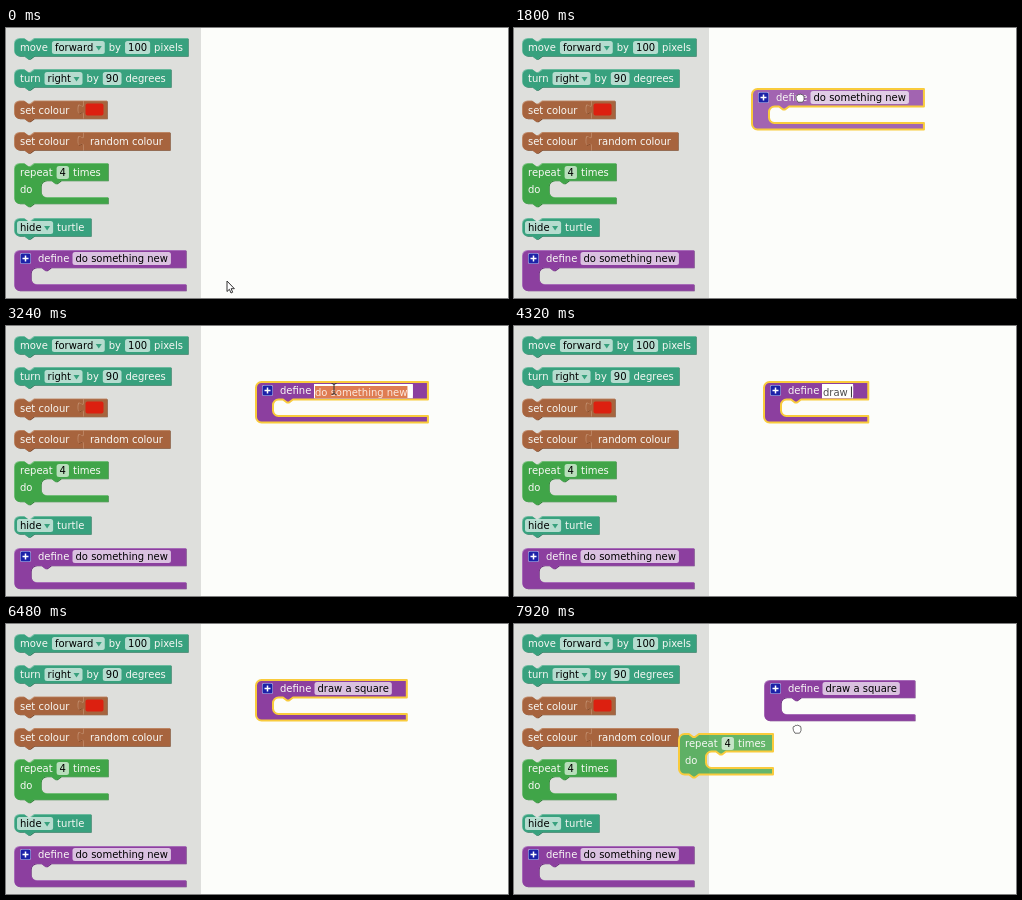
An HTML page with a canvas that plays this animation: 502x270 px, repeating every 8000 ms.

```html
<!DOCTYPE html>
<html lang="en">
<head>
<meta charset="utf-8">
<title>Block editor</title>
<style>
  html, body { margin: 0; width: 100%; height: 100%; overflow: hidden; background: #fcfdfa; }
  canvas { display: block; width: 502px; height: 270px; }
</style>
</head>
<body>
<canvas id="stage"></canvas>
<script>
const W = 502, H = 270, LOOP = 8000, STEP = 180;
const canvas = document.getElementById('stage');
const ctx = canvas.getContext('2d');
const dpr = window.devicePixelRatio || 1;
canvas.width = W * dpr;
canvas.height = H * dpr;

const FONT = '10px "DejaVu Sans", Verdana, sans-serif';
const TEAL = ['#38a17e', '#7cc2a9', '#2a7c60'];
const BROWN = ['#a7643e', '#c39070', '#7d4829'];
const GREEN = ['#40a548', '#80c585', '#2f7f36'];
const PURPLE = ['#8c3f9f', '#b07bc0', '#682b7a'];
const YELLOW = '#f9cb3c';
const OLD_NAME = 'do something new', NEW_NAME = 'draw a square';
const R = 5.5;

// Timeline in ms
const GRAB = 1080, DROP = 2160, EDIT = 2880, TYPE = 3420, KEY = 225, DONE = 6300;
const SHOW = 6660, GRAB2 = 7380;
const HOME = [8, 222], REPEAT = [8, 135];
const pointerPath = [[0, 221, 253], [360, 218, 252], [900, 57, 231], [GRAB, 57, 231],
  [1800, 286, 70], [DROP, 298, 65], [2340, 298, 65], [2700, 328, 63], [SHOW, 328, 63],
  [7200, 50, 144], [GRAB2, 50, 144], [7920, 283, 105]];
const definePath = [[GRAB, ...HOME], [1800, 238, 61], [DROP, 250, 56]];
const repeatPath = [[GRAB2, ...REPEAT], [7920, 165, 110]];

function along(keys, t) {
  if (t <= keys[0][0]) return keys[0].slice(1);
  for (let i = 1; i < keys.length; i++) {
    const [t0, x0, y0] = keys[i - 1], [t1, x1, y1] = keys[i];
    if (t <= t1) {
      const p = (t - t0) / (t1 - t0);
      return [x0 + (x1 - x0) * p, y0 + (y1 - y0) * p];
    }
  }
  return keys[keys.length - 1].slice(1);
}

function textWidth(s) {
  ctx.font = FONT;
  return ctx.measureText(s).width;
}

function text(s, x, y, color = '#f8f8f5') {
  ctx.font = FONT;
  ctx.fillStyle = color;
  ctx.fillText(s, x, y);
}

function rounded(x, y, w, h, r, fill) {
  ctx.beginPath();
  ctx.roundRect(x, y, w, h, r);
  ctx.fillStyle = fill;
  ctx.fill();
}

// Outline of a stacking block, optionally with a statement mouth
function blockShape(x, y, w, h, { stack = true, mouth } = {}) {
  const p = new Path2D();
  const bump = (left, top) => {
    p.lineTo(left + 20, top);
    p.lineTo(left + 16, top + 3);
    p.lineTo(left + 14, top + 3);
    p.lineTo(left + 10, top);
  };
  p.moveTo(x, y + R);
  p.arcTo(x, y, x + R, y, R);
  if (stack) {
    p.lineTo(x + 10, y);
    p.lineTo(x + 14, y + 3);
    p.lineTo(x + 16, y + 3);
    p.lineTo(x + 20, y);
  }
  p.lineTo(x + w, y);
  if (mouth) {
    const mx = x + mouth, top = y + 17.5, bottom = y + 34;
    p.lineTo(x + w, top);
    bump(mx, top);
    p.arcTo(mx, top, mx, top + R, R);
    p.arcTo(mx, bottom, mx + R, bottom, R);
    p.lineTo(x + w, bottom);
  }
  p.lineTo(x + w, y + h);
  if (stack) bump(x, y + h);
  p.arcTo(x, y + h, x, y + h - R, R);
  p.closePath();
  return p;
}

// Value block with a puzzle tab on its left side
function valueShape(x, y, w, h) {
  return new Path2D(`M${x} ${y}v3.4c0 6.8 -5.4 -5.4 -5.4 5.1s5.4 -1.7 5.4 5.1V${y + h}h${w}V${y}z`);
}

function paint(shape, [main, light, dark], state) {
  if (state) {
    ctx.globalAlpha = state === 'drag' ? 0.8 : 1;
    ctx.fillStyle = main;
    ctx.fill(shape);
    ctx.globalAlpha = 1;
    ctx.strokeStyle = YELLOW;
    ctx.lineWidth = 2;
    ctx.lineJoin = 'round';
    ctx.stroke(shape);
    return;
  }
  const shifted = color => {
    ctx.save();
    ctx.translate(0.7, 0.7);
    ctx.fillStyle = color;
    ctx.fill(shape);
    ctx.restore();
  };
  shifted(dark);
  ctx.fillStyle = light;
  ctx.fill(shape);
  ctx.save();
  ctx.clip(shape);
  shifted(main);
  ctx.restore();
}

// Lays out labels, [fields] and {menus} from left to right
function row(parts, x, y, color) {
  for (const part of parts) {
    const isLabel = typeof part === 'string';
    const s = isLabel ? part : part.menu || part.field;
    const w = textWidth(s);
    if (isLabel) {
      text(s, x, y + 13);
      x += w + 4;
      continue;
    }
    const full = w + (part.menu ? 14.5 : 6);
    rounded(x, y + 3, full, 13, 2.5, 'rgba(255,255,255,.63)');
    text(s, x + 3, y + 13, '#000');
    if (part.menu) {
      const ax = x + w + 5.5;
      ctx.beginPath();
      ctx.moveTo(ax, y + 8);
      ctx.lineTo(ax + 6, y + 8);
      ctx.lineTo(ax + 3, y + 12.5);
      ctx.fillStyle = color;
      ctx.fill();
    }
    x += full + 4;
  }
}

function simpleBlock(y, w, parts, colors = TEAL) {
  paint(blockShape(8, y, w, 18), colors);
  row(parts, parts[0].menu ? 11 : 14, y, colors[0]);
}

function colourBlock(y, w) {
  simpleBlock(y, 69, ['set colour'], BROWN);
  paint(valueShape(77, y, w, 18), BROWN);
}

function repeatBlock([x, y], state) {
  paint(blockShape(x, y, 94, 40.5, { mouth: 27 }), GREEN, state);
  row(['repeat', { field: '4' }, 'times'], x + 6, y, GREEN[0]);
  text('do', x + 6, y + 30);
}

function defineBlock([x, y], name, state) {
  const w = textWidth(name);
  paint(blockShape(x, y, w + 79.5, 40.5, { stack: false, mouth: 17 }), PURPLE, state);
  rounded(x + 6, y + 3, 11, 11, 2, '#d5d5f0');
  rounded(x + 6.5, y + 3.5, 10, 10, 1.5, '#1b21a8');
  ctx.fillStyle = '#fff';
  ctx.fillRect(x + 8.5, y + 7.75, 6, 1.5);
  ctx.fillRect(x + 10.75, y + 5.5, 1.5, 6);
  text('define', x + 24, y + 12);
  rounded(x + 58.5, y + 2, w + 6, 13, 2.5, 'rgba(255,255,255,.68)');
  text(name, x + 61.5, y + 12, '#000');
}

function editor([x, y], typed, name) {
  const w = textWidth(name) + 6.5, left = x + 58, top = y + 2;
  const tw = textWidth(typed || name);
  const tx = Math.min(left + 1, left + w - 1 - tw);
  ctx.save();
  ctx.beginPath();
  ctx.rect(left, top, w, 14.5);
  ctx.clip();
  ctx.fillStyle = '#fff';
  ctx.fillRect(left, top, w, 14.5);
  if (typed) {
    text(typed, tx, y + 13.5, '#4c4c4c');
    ctx.fillStyle = '#333';
    ctx.fillRect(tx + tw, top + 2.5, 1, 11);
  } else {
    ctx.fillStyle = '#df7c52';
    ctx.fillRect(tx, top + 2, tw, 12);
    text(name, tx, y + 13.5, '#fbe9df');
  }
  ctx.restore();
}

function drawFlyout() {
  ctx.fillStyle = '#dedfdc';
  ctx.fillRect(0, 0, 195, H);
  simpleBlock(10, 174, ['move', { menu: 'forward' }, 'by', { field: '100' }, 'pixels']);
  simpleBlock(41, 157, ['turn', { menu: 'right' }, 'by', { field: '90' }, 'degrees']);
  colourBlock(72.5, 24);
  rounded(79.5, 75.5, 18, 12, 2, '#dc2010');
  colourBlock(104, 87);
  text('random colour', 84, 117);
  repeatBlock(REPEAT);
  simpleBlock(190, 77, [{ menu: 'hide' }, 'turtle']);
  defineBlock(HOME, OLD_NAME);
}

const pointers = {
  arrow: new Path2D('M0 0V10.5L2.4 8.3L4 12L5.7 11.2L4.1 7.7H7.4z'),
  hand: new Path2D('M-4 -1Q-4 -3 -2.3 -2.6Q-1.8 -4.4 -.3 -3.5Q1 -4.6 2 -3.1Q4 -3.4 4 -1V1.5Q3.4 3 2.6 4.2H-2Q-4 1.8 -4 -1z'),
  beam: new Path2D('M-2.5 -5.5Q0 -5.5 0 -4V4Q0 5.5 -2.5 5.5M2.5 -5.5Q0 -5.5 0 -4M0 4Q0 5.5 2.5 5.5')
};

function drawPointer(kind, [x, y]) {
  ctx.save();
  ctx.translate(x, y);
  ctx.lineWidth = kind === 'hand' ? 0.7 : 1;
  ctx.strokeStyle = '#333';
  ctx.fillStyle = '#fff';
  if (kind !== 'beam') ctx.fill(pointers[kind]);
  ctx.stroke(pointers[kind]);
  ctx.restore();
}

function pointerKind(t) {
  if ((t >= GRAB && t < 2520) || t >= GRAB2) return 'hand';
  if (t >= 2520 && t < TYPE) return 'beam';
  return 'arrow';
}

function draw(t) {
  ctx.setTransform(dpr, 0, 0, dpr, 0, 0);
  ctx.fillStyle = '#fcfdfa';
  ctx.fillRect(0, 0, W, H);
  drawFlyout();

  if (t >= GRAB) {
    const pos = along(definePath, t);
    const count = Math.max(0, Math.floor((t - TYPE) / KEY) + 1);
    // While typing, the block follows one key behind the editor
    const name = t >= DONE ? NEW_NAME : count > 1 ? NEW_NAME.slice(0, count - 1) : OLD_NAME;
    const state = t <= DROP ? 'drag' : t < GRAB2 ? 'selected' : '';
    defineBlock(pos, name, state);
    if (t >= EDIT && t < DONE) editor(pos, NEW_NAME.slice(0, count), name);
  }
  if (t >= GRAB2) repeatBlock(along(repeatPath, t), 'drag');
  if (t < TYPE || t >= SHOW) drawPointer(pointerKind(t), along(pointerPath, t));
}

const start = performance.now();
function tick() {
  const t = (performance.now() - start) % LOOP;
  draw(Math.floor(t / STEP) * STEP);
  requestAnimationFrame(tick);
}
tick();
</script>
</body>
</html>
```
